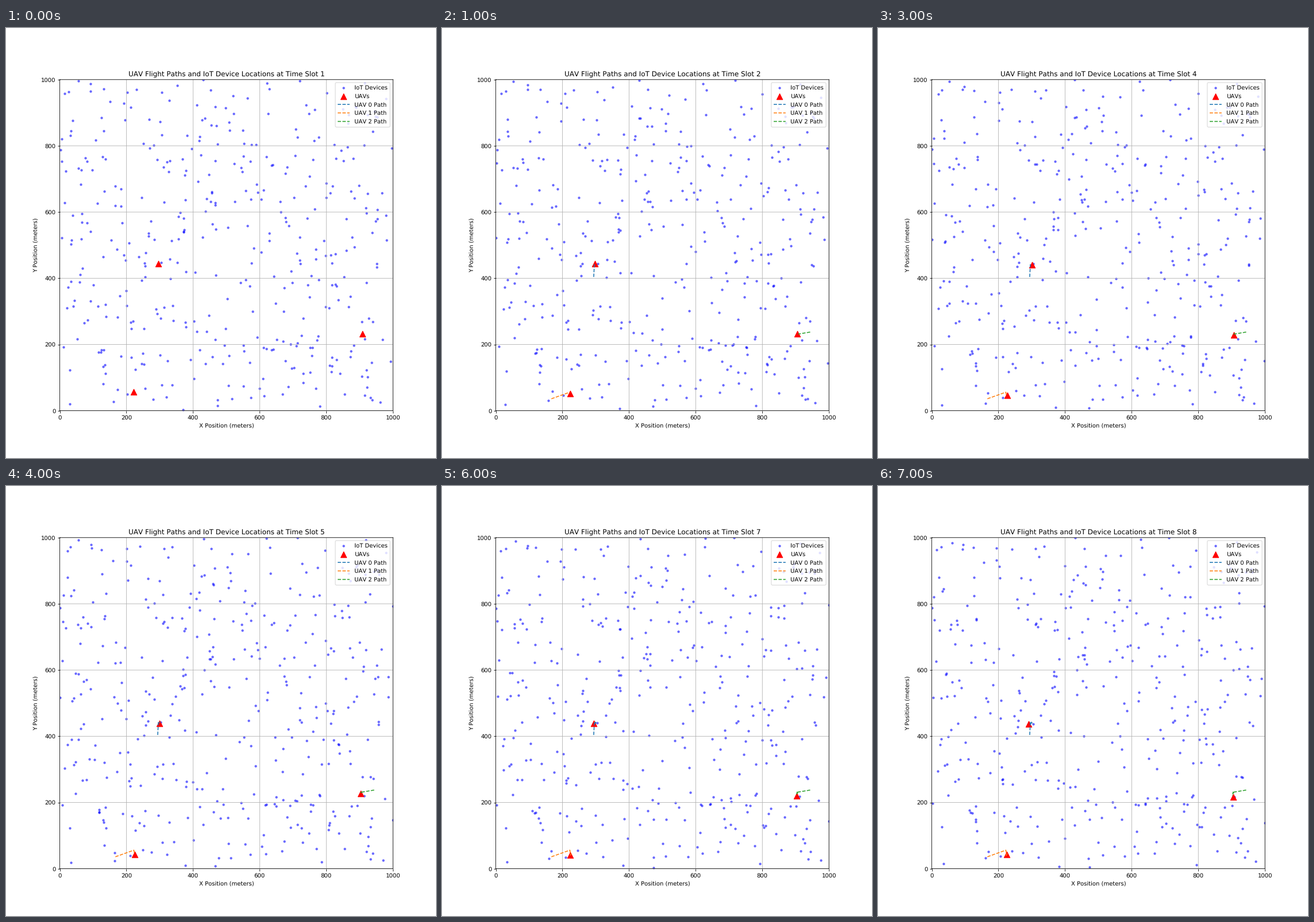
A matplotlib script that plays this animation: 748x748 px, repeating every 8000 ms.

```python
import numpy as np
import matplotlib.pyplot as plt
from matplotlib.animation import FuncAnimation

SLOTS = 8
DEVICES = 400
AREA = 1000
STEP = 5

# Soft, unsnapped rendering of lines and glyphs
plt.rcParams.update({
    "path.snap": False,
    "text.hinting": "no_hinting",
    "text.hinting_factor": 1,
})

# Slot 0 is the launch point; positions between key slots are interpolated
KEY_SLOTS = [0, 1, 3, 4, 6, 8]
UAV_KEYS = [
    [(294, 404), (296, 444), (298.5, 444), (301, 440), (297, 439), (291, 437)],
    [(167, 36), (222.5, 56), (223.5, 48), (227, 47), (223.5, 40), (225, 43)],
    [(943.5, 237.5), (907.5, 231.5), (902, 232), (906, 229), (900.5, 224),
     (905, 217)],
]


def fly(keys):
    """Position at launch and at the end of every slot."""
    slots = np.arange(SLOTS + 1)
    x, y = np.transpose(keys)
    return np.column_stack([np.interp(slots, KEY_SLOTS, x),
                            np.interp(slots, KEY_SLOTS, y)])


def roam(rng):
    """Random walk of all devices, kept inside the area."""
    slots = [rng.uniform(0, AREA, (DEVICES, 2))]
    for _ in range(SLOTS - 1):
        step = rng.uniform(-STEP, STEP, (DEVICES, 2))
        slots.append(np.clip(slots[-1] + step, 0, AREA))
    return slots


tracks = np.array([fly(keys) for keys in UAV_KEYS])
device_slots = roam(np.random.default_rng(7))

fig, ax = plt.subplots(figsize=(10, 10), dpi=74.8)
devices = ax.scatter(*device_slots[0].T, s=10, c="blue", alpha=0.5,
                     label="IoT Devices")
uavs = ax.scatter(*tracks[:, 1].T, s=100, c="red", marker="^", label="UAVs")
paths = [ax.plot([], [], "--", label=f"UAV {i} Path")[0]
         for i in range(len(tracks))]

ax.set_xlim(0, AREA)
ax.set_ylim(0, AREA)
ax.set_xlabel("X Position (meters)")
ax.set_ylabel("Y Position (meters)")
ax.grid(True)
ax.legend(loc="upper right")


def update(slot):
    devices.set_offsets(device_slots[slot])
    uavs.set_offsets(tracks[:, slot + 1])
    for path, track in zip(paths, tracks):
        path.set_data(*track[:slot + 1].T)
    ax.set_title("UAV Flight Paths and IoT Device Locations "
                 f"at Time Slot {slot + 1}")
    return [devices, uavs, *paths]


anim = FuncAnimation(fig, update, frames=SLOTS, interval=1000,
                     repeat=True, repeat_delay=0, blit=False)
plt.show()
```
